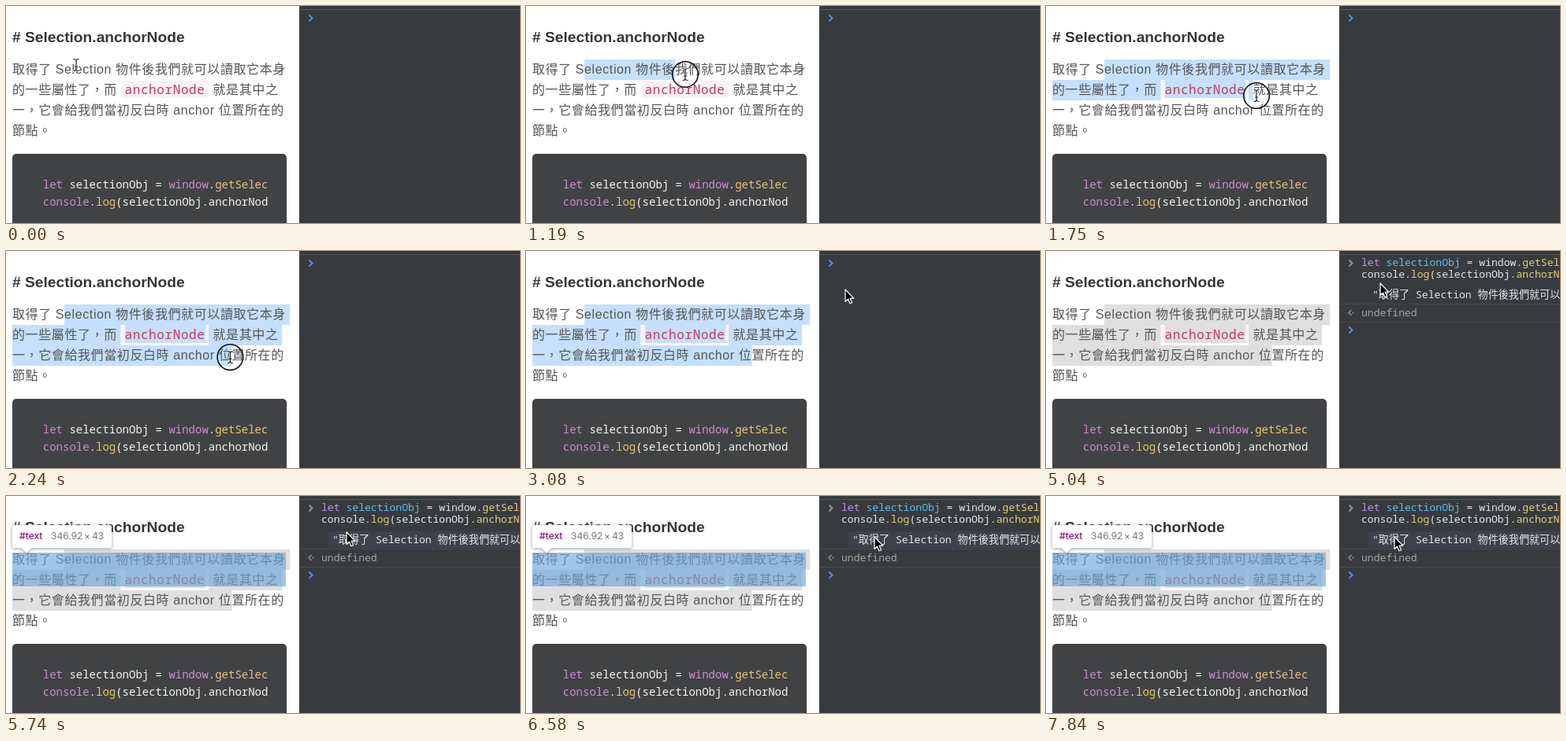
Recreate the animation shown at these times as an HTML page. Size 652 px wide and 276 px high, loop 7.91 s.

```html
<!DOCTYPE html>
<html lang="zh-Hant">
<head>
<meta charset="utf-8">
<title>Selection.anchorNode</title>
<style>
  html, body { margin: 0; width: 100%; height: 100%; overflow: hidden; background: #fff; }
  svg { display: block; width: 652px; height: 276px; }
  text { white-space: pre; }
  .prose { font: 16px "Liberation Sans", "Noto Sans CJK TC", "Noto Sans CJK", sans-serif; letter-spacing: .6px; fill: #555; }
  .title { font: bold 19.2px "Liberation Sans", sans-serif; fill: #363636; }
  .mono { font-family: "Noto Sans Mono", "Noto Sans CJK TC", "Noto Sans CJK", monospace; }
  .inline { font-size: 16px; letter-spacing: .6px; fill: #c5385f; }
  .block { font-size: 14px; fill: #f4f4f2; }
  .block .k { fill: #cc8fce; }
  .block .f { fill: #e6c678; }
  .console { font-size: 13.1px; fill: #e4e5e6; }
  .console .k { fill: #bd93e6; }
  .console .d { fill: #62bdea; }
  .console .f { fill: #e2cd78; }
  .tip { font: 12px Inter, sans-serif; fill: #777; }
  .tip .n { font-weight: 500; fill: #881280; }
  .chev { fill: none; stroke-width: 1.8; }
  #tip { filter: drop-shadow(0 1px 2px rgba(0, 0, 0, .4)); }
  [hidden] { display: none; }
</style>
</head>
<body>
<svg viewBox="0 0 652 276">
  <defs>
    <clipPath id="pre"><rect x="40" y="190" width="292" height="86"/></clipPath>
  </defs>

  <!-- article -->
  <rect width="372" height="276" fill="#fff"/>
  <rect x="146" y="95" width="111" height="22" rx="3" fill="#fbf0f3"/>
  <g id="sel"></g>
  <text class="title" x="8" y="46"># Selection.anchorNode</text>
  <g class="prose">
    <text x="8" y="86">取得了 Selection 物件後我們就可以讀取它本身</text>
    <text x="8" y="112">的一些屬性了，而</text>
    <text x="262.5" y="112">就是其中之</text>
    <text x="8" y="138">一，它會給我們當初反白時 anchor 位置所在的</text>
    <text x="8" y="164">節點。</text>
  </g>
  <text class="mono inline" x="150.5" y="112">anchorNode</text>

  <path d="M8 276V193a5 5 0 0 1 5-5H351a5 5 0 0 1 5 5V276Z" fill="#404244"/>
  <g class="mono block" clip-path="url(#pre)">
    <text x="46.8" y="232"><tspan class="k">let</tspan> selectionObj = <tspan class="k">window</tspan>.<tspan class="f">getSelection</tspan>()</text>
    <text x="46.8" y="254"><tspan class="k">console</tspan>.<tspan class="f">log</tspan>(selectionObj.anchorNode)</text>
  </g>

  <!-- node highlight -->
  <g id="hover" hidden>
    <rect x="8" y="72" width="347" height="43" fill="rgba(111,168,220,.66)"/>
    <g id="tip">
      <path d="M10 37H132a2 2 0 0 1 2 2V64a2 2 0 0 1-2 2H33l-7 6-7-6H10a2 2 0 0 1-2-2V39a2 2 0 0 1 2-2Z" fill="#fff"/>
    </g>
    <g class="tip">
      <text class="n" x="17" y="55">#text</text>
      <text x="57" y="55">346.92</text>
      <text x="99" y="55">×</text>
      <text x="109" y="55">43</text>
    </g>
  </g>

  <!-- console -->
  <rect x="372" width="280" height="276" fill="#383b3e"/>
  <rect x="372" y="4" width="280" height="1" fill="#55585b"/>
  <rect id="row" x="408" y="45" width="244" height="21" rx="3" fill="#3d424c" hidden/>
  <path id="prompt" class="chev" d="M384.5 11.5l4 4-4 4" stroke="#5a8ff0"/>
  <g class="mono console">
    <g id="input" hidden>
      <text x="400" y="19"><tspan class="k">let</tspan> <tspan class="d">selectionObj</tspan> = window.<tspan class="f">getSelection</tspan>()</text>
      <text x="400" y="34">console.<tspan class="f">log</tspan>(selectionObj.<tspan class="f">anchorNode</tspan>)</text>
    </g>
    <g id="output" hidden>
      <path d="M372 67.5H652M372 90.5H652" stroke="#484b4e"/>
      <text x="414" y="60">"取得了 Selection 物件後我們就可以讀取</text>
      <text x="400" y="83" fill="#a2a5a8">undefined</text>
      <path class="chev" d="M387.5 75l-3.5 3.5 3.5 3.5" stroke="#94979a" style="stroke-width:1.4"/>
      <circle cx="389.5" cy="78.5" r="1" fill="#94979a"/>
      <path class="chev" d="M384.5 96.5l4 4-4 4" stroke="#5a8ff0"/>
    </g>
  </g>

  <!-- pointer -->
  <g id="pointer">
    <circle id="ring" r="16.3" fill="none" stroke="#111" stroke-width="1.6" hidden/>
    <g id="beam" fill="none" stroke-linecap="round">
      <path d="M-3-7.5Q0-7.5 0-5V5Q0 7.5-3 7.5M3-7.5Q0-7.5 0-5M3 7.5Q0 7.5 0 5M-1.8 2H1.8" stroke="#fff" stroke-width="2.6"/>
      <path d="M-3-7.5Q0-7.5 0-5V5Q0 7.5-3 7.5M3-7.5Q0-7.5 0-5M3 7.5Q0 7.5 0 5M-1.8 2H1.8" stroke="#222" stroke-width="1.2"/>
    </g>
    <path id="arrow" d="M0 0V15.3L3.5 12.1 5.9 17.7 8.5 16.6 6.1 11.2H10.8Z" fill="#000" stroke="#fff" stroke-width="1.2" stroke-linejoin="round"/>
  </g>
</svg>
<script>
const LOOP = 7910, STEP = 70;
const $ = id => document.getElementById(id);
const show = (id, on) => $(id).toggleAttribute('hidden', !on);
const within = (t, a, b) => t >= a && t < b;

// pointer path: time, x, y
const path = [
  [0, 89, 75], [630, 74, 81], [770, 74, 81], [1190, 202, 87], [1750, 267, 114],
  [2380, 285, 137], [2660, 285, 137], [3080, 405, 49], [3430, 427, 25], [3920, 427, 25],
  [4200, 424, 41], [5180, 424, 41], [5740, 432, 46], [6580, 442, 52], [LOOP, 442, 52]
];

// slope at a key; zero where the pointer rests
function slope(i, c) {
  const a = path[i - 1], k = path[i], b = path[i + 1];
  if (!a || !b || a[1] === k[1] || b[1] === k[1]) return 0;
  return (b[c] - a[c]) / (b[0] - a[0]);
}

function pointerAt(t) {
  let i = 0;
  while (i < path.length - 2 && t >= path[i + 1][0]) i++;
  const a = path[i], b = path[i + 1], d = b[0] - a[0];
  const u = Math.max(0, (t - a[0]) / d), v = u * u, w = v * u;
  return [1, 2].map(c =>
    a[c] + (3 * v - 2 * w) * (b[c] - a[c]) +
    (w - 2 * v + u) * d * slope(i, c) + (w - v) * d * slope(i + 1, c));
}

// caret stops on each line of the paragraph
const run = (x, step, n) => Array.from({ length: n + 1 }, (_, i) => x + step * i);
const stops = [
  [74, 83.6, 87.7, 97.2, 105.8, 110.9, 115, 124.5, 134, ...run(139.1, 16.6, 13)],
  [...run(8, 16.6, 8), ...run(151, 10.2, 10), ...run(262.5, 16.6, 5)],
  [...run(8, 16.6, 12), ...run(212.3, 8.8, 6), ...run(270, 16.6, 5)]
];
const snap = (x, list) => list.reduce((p, s) => Math.abs(s - x) < Math.abs(p - x) ? s : p);

// selectable boxes: line, left, right, height
const boxes = [[0, 74, 360, 26], [1, 8, 145.5, 26], [1, 151, 253, 23], [1, 257, 350, 26], [2, 8, 286.6, 26]]
  .map(([line, x, right, h]) => {
    const el = document.createElementNS('http://www.w3.org/2000/svg', 'rect');
    el.setAttribute('x', x);
    el.setAttribute('y', 68 + 26 * line);
    el.setAttribute('height', h);
    $('sel').append(el);
    return { el, line, x, right };
  });

function drawSelection(t) {
  const [x, y] = pointerAt(Math.min(t, 2450) - STEP);
  const row = y < 94 ? 0 : y < 120 ? 1 : 2;
  const end = snap(x, stops[row]);
  for (const b of boxes) {
    const right = b.line < row ? b.right : b.line > row ? b.x : Math.min(end, b.right);
    b.el.setAttribute('width', t < 770 ? 0 : Math.max(0, right - b.x));
  }
  $('sel').setAttribute('fill', t < 3360 ? '#c5dffd' : '#dfdfdf');
}

function draw(t) {
  const [x, y] = pointerAt(t);
  const hover = t >= 5460;
  $('pointer').setAttribute('transform', `translate(${x.toFixed(2)} ${y.toFixed(2)})`);
  show('beam', x < 358);
  show('arrow', x >= 358);
  show('ring', within(t, 770, 2380) || within(t, 3360, 3540));
  drawSelection(t);
  show('input', t >= 3990);
  show('output', t >= 4760);
  $('prompt').setAttribute('stroke', t < 4760 ? '#5a8ff0' : '#94979a');
  show('hover', hover);
  show('row', hover);
}

const start = performance.now();
function tick() {
  const t = (performance.now() - start) % LOOP;
  draw(Math.floor(t / STEP) * STEP);
  requestAnimationFrame(tick);
}
tick();
</script>
</body>
</html>
```
